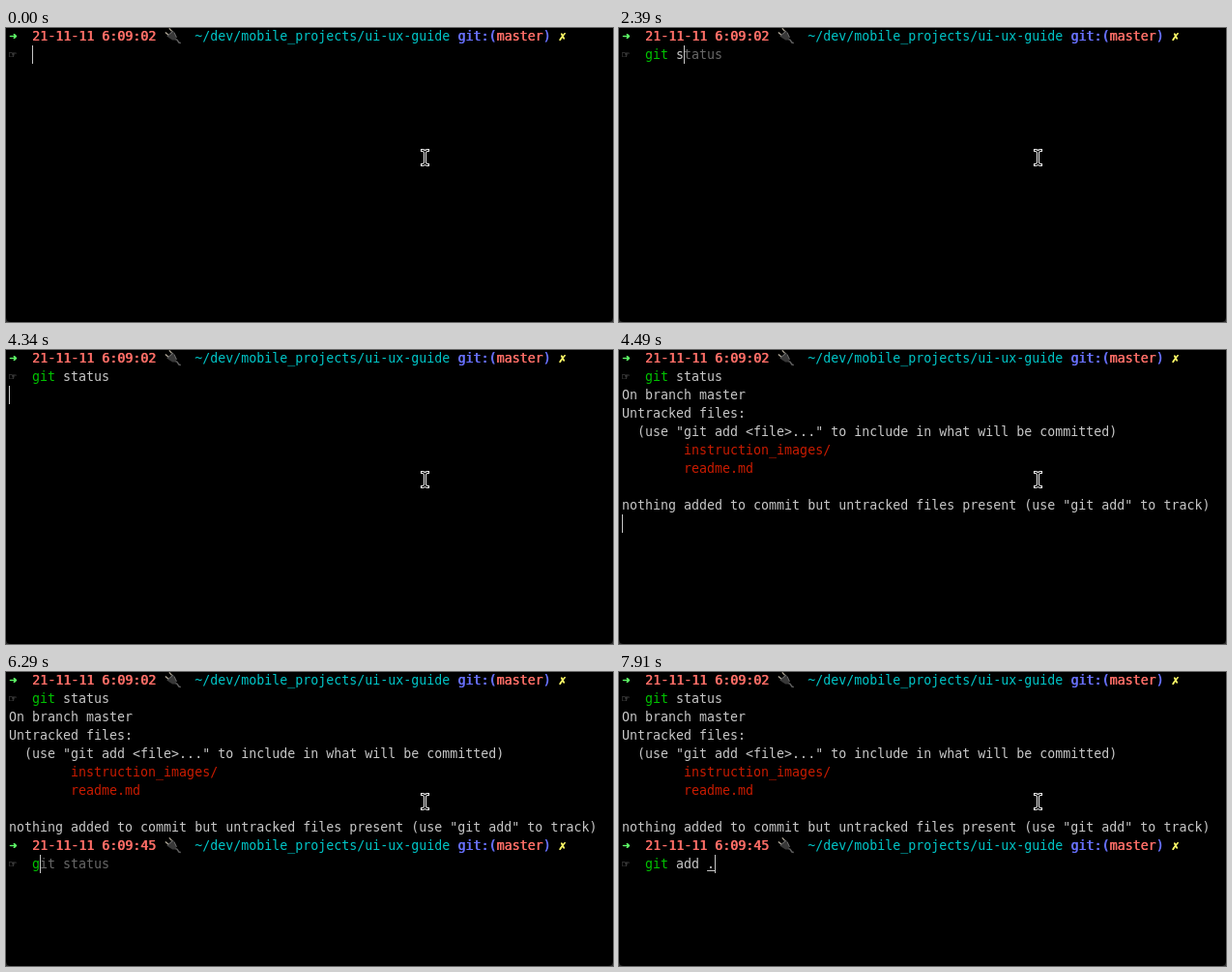
These frames come from a looping animation (628x304 px, 8 s). An HTML page:

```html
<!DOCTYPE html>
<html lang="en">
<head>
<meta charset="utf-8">
<title>Terminal session</title>
<style>
  html, body { margin: 0; width: 100%; height: 100%; overflow: hidden; background: #000; }
  #screen {
    position: relative; width: 628px; height: 304px; overflow: hidden;
    background: #000; color: #c7c7c7;
    font: 13.3px/19px "DejaVu Sans Mono", "Liberation Mono", monospace;
    font-variant-ligatures: none;
  }
  .row { position: absolute; left: 3px; top: calc(19px * var(--r) - 1px); height: 19px; white-space: pre; }
  /* bold is a light smear of the regular weight */
  .row b { font-weight: normal; text-shadow: .6px 0 currentColor; }
  .cell { display: inline-block; width: 8px; height: 19px; vertical-align: top; text-align: center; }
  .wide { width: 16px; }
  .cell svg { display: block; overflow: visible; }
  .hand { font: 10px/19px "DejaVu Sans", sans-serif; color: #c7c7c7; text-indent: -.5px; }
  .lime { color: #5ffa68; }
  .rose { color: #ff6e67; }
  .cyan { color: #00c5c7; }
  .blue { color: #6871ff; }
  .gold { color: #fffc67; }
  .red { color: #c91b00; }
  .green { color: #00c200; }
  .ghost { color: #686868; }
  .path { text-decoration: underline; text-underline-offset: 2px; }
  #caret { position: absolute; width: 1px; height: 19px; background: #c7c7c7; }
  #overlay { position: absolute; left: 0; top: 0; }
  [hidden] { display: none; }
</style>
</head>
<body>
<div id="screen">
  <div id="first"></div>
  <div id="output" hidden>
    <div class="row" style="--r:2">On branch master</div>
    <div class="row" style="--r:3">Untracked files:</div>
    <div class="row" style="--r:4">  (use "git add &lt;file&gt;..." to include in what will be committed)</div>
    <div class="row red" style="--r:5">        instruction_images/</div>
    <div class="row red" style="--r:6">        readme.md</div>
    <div class="row" style="--r:8">nothing added to commit but untracked files present (use "git add" to track)</div>
  </div>
  <div id="second" hidden></div>
  <div id="caret"></div>
  <svg id="overlay" width="628" height="304" fill="none">
    <defs>
      <path id="beam" d="M430.5 126.5q2.6 0 3 2.2q.4-2.2 3-2.2M433.5 128.5V139.5M430.5 141.5q2.6 0 3-2.2q.4 2.2 3 2.2"/>
      <path id="corner" d="M0 299q0 5 5 5H0Z" fill="#2b2b2b"/>
    </defs>
    <!-- text pointer -->
    <g stroke-linecap="square">
      <use href="#beam" stroke="#fff" stroke-width="3"/>
      <use href="#beam" stroke="#000" stroke-width="1.1"/>
    </g>
    <!-- window corners -->
    <use href="#corner"/>
    <use href="#corner" transform="translate(628) scale(-1 1)"/>
  </svg>
</div>
<script>
const LOOP = 8000, ENTER = 4340, OUTPUT = 4490, PROMPT = 4790;
const CARET_OFF = -1;

// [time, characters typed]
const firstKeys = [
  [0, 0], [440, CARET_OFF], [890, 0], [1040, 1], [1490, 2], [1940, 3],
  ...Array.from({ length: 6 }, (_, i) => [2240 + 150 * i, 4 + i]),
  [3290, 10]
];
const secondKeys = [
  [PROMPT, 0], [5540, CARET_OFF], [6140, 0], [6290, 1], [6440, 2], [6580, 3],
  [6880, 4], [7030, 5], [7170, 6], [7470, 7], [7610, 8], [7910, 9]
];

const $ = id => document.getElementById(id);
const span = (cls, text) => text ? `<span class="${cls}">${text}</span>` : "";

const plug = `<svg width="18" height="18" viewBox="0 0 18 18" fill="none">
  <path d="M12 12.5q2.5.5 3 2.2t2.8 1.8" stroke="#606060" stroke-width="1.5"/>
  <path d="M1.8 5.4l3.4 2.8M5.8 1.4l3 3.2" stroke="#b0a898" stroke-width="1.3"/>
  <path d="M3.6 8.9L9.6 3.6L11 5.2L13.6 10.6L12 13.4L9.2 13.6L4.6 10.6Z" fill="#383838"/>
  <path d="M3.8 9.4L10 4.2M11 5.6L13.4 10.8" stroke="#6c6c6c"/>
</svg>`;

function buildPrompt(id, row, clock) {
  $(id).innerHTML =
    `<div class="row" style="--r:${row}"><b class="cell lime">➜</b>  ` +
    `<b class="rose">21-11-11 ${clock}</b> <span class="cell wide">${plug}</span>  ` +
    span("cyan", "~/dev/mobile_projects/ui-ux-guide") +
    ` <b class="blue">git:(</b><b class="rose">master</b><b class="blue">)</b> ` +
    `<b class="cell gold">✗</b></div>` +
    `<div class="row" style="--r:${row + 1}"><span class="cell hand">☞</span>  <span class="cmd"></span></div>`;
}

function typeCommand(id, count) {
  const n = Math.max(count, 0);
  const text = id === "second" && n > 4 ? "git add ." : "git status";
  const typed = text.slice(0, n);
  const head = typed.slice(0, 3);
  const args = typed.slice(3).replace(".", span("path", "."));
  // an unfinished command name is marked as unknown
  const name = head === "gi" ? `<b class="rose">gi</b>` : span("green", head);
  $(id).querySelector(".cmd").innerHTML = name + args + (n ? span("ghost", text.slice(n)) : "");
}

function typedAt(keys, t) {
  let count = 0;
  for (const [start, n] of keys) if (t >= start) count = n;
  return count;
}

function placeCaret(row, col) {
  const style = $("caret").style;
  style.left = 3 + 8 * col + "px";
  style.top = 19 * row - 1 + "px";
}

let last = "";
function draw(now) {
  const t = now % LOOP;
  const a = typedAt(firstKeys, t), b = typedAt(secondKeys, t);
  const phase = [ENTER, OUTPUT, PROMPT].filter(start => t >= start).length;
  const state = [a, b, phase].join();
  if (state === last) return;
  last = state;
  typeCommand("first", a);
  typeCommand("second", b);
  $("output").hidden = phase < 2;
  $("second").hidden = phase < 3;
  const active = [a, 0, 0, b][phase];
  $("caret").hidden = active === CARET_OFF;
  const [row, col] = [[1, 3 + a], [2, 0], [9, 0], [10, 3 + b]][phase];
  placeCaret(row, col);
}

buildPrompt("first", 0, "6:09:02");
buildPrompt("second", 9, "6:09:45");
const begin = performance.now();
function tick() {
  draw(performance.now() - begin);
  requestAnimationFrame(tick);
}
tick();
</script>
</body>
</html>
```
